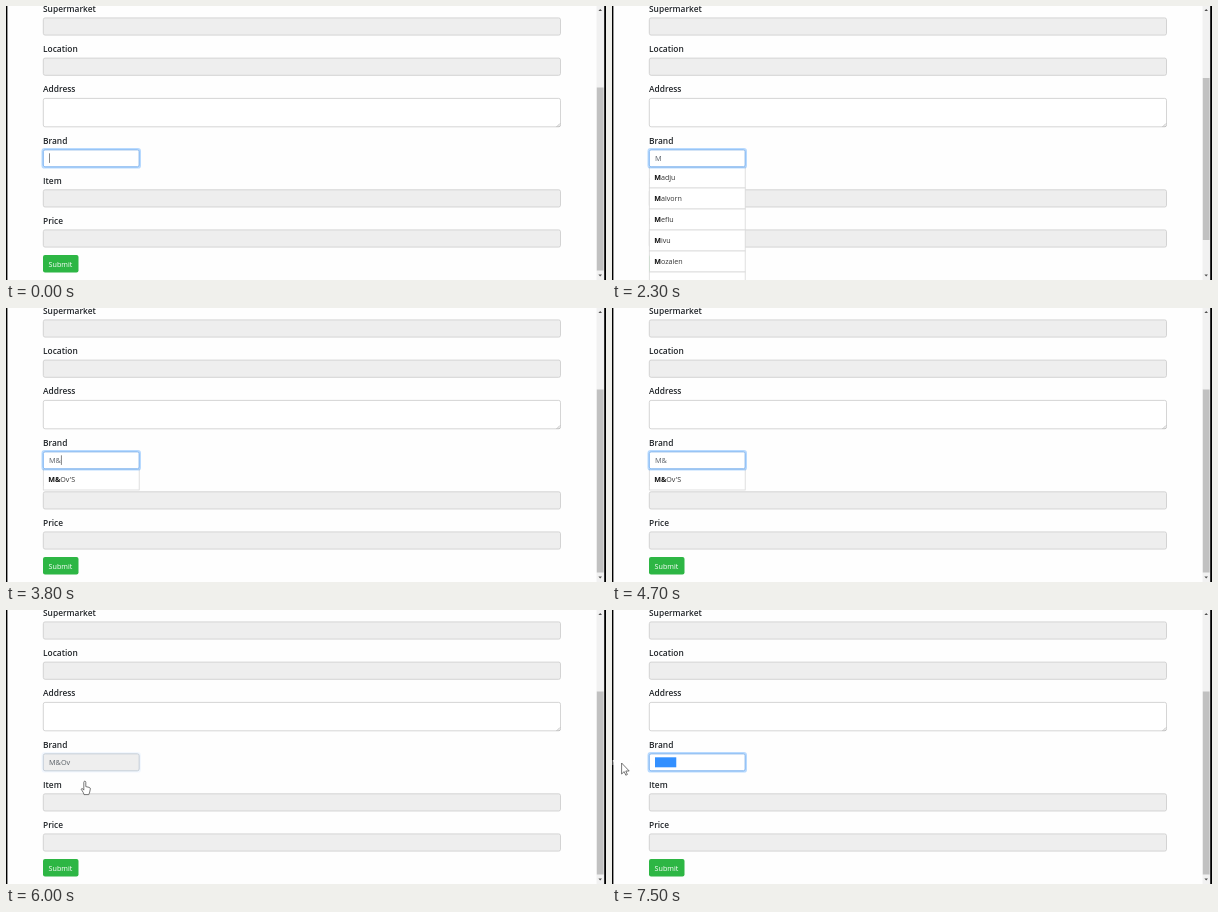
An HTML page that plays this animation: 600x274 px, repeating every 8 s.

```html
<!DOCTYPE html>
<html lang="en">
<head>
<meta charset="utf-8">
<title>Autocomplete form</title>
<style>
html, body { margin: 0; width: 100%; height: 100%; overflow: hidden; background: #fefefe; }
svg { display: block; width: 600px; height: 274px; font: 7.15px "Open Sans", "Noto Sans", sans-serif; }
.label { font-size: 8.4px; font-weight: 600; fill: #212529; }
.box { stroke: #cbcbcb; stroke-width: .8; }
.typed { font-size: 7.3px; fill: #5a6067; }
.item { fill: #333; }
.bold { font-weight: 700; fill: #111; }
.cursor { fill: #fff; stroke: #555; stroke-width: .8; stroke-linejoin: round; }
</style>
</head>
<body>
<svg viewBox="0 0 600 274">
  <g id="form"></g>
  <path d="M554 117.5l-3.5 3.5M554 119.5l-1.5 1.5" stroke="#999" stroke-width=".6"/>
  <rect x="37" y="249" width="35.5" height="17.6" rx="2" fill="#2db644"/>
  <text x="42.6" y="260.6" fill="#fff">Submit</text>

  <rect x="590.5" width="7.5" height="274" fill="#f1f1f1"/>
  <rect id="thumb" x="590.8" width="6.8" fill="#c1c1c1"/>
  <path d="M592.4 5l1.8-2 1.8 2zM592.4 268.5l1.8 2 1.8-2z" fill="#505050"/>
  <path d="M0 0h1.4v274H0zM598.2 0h1.8v274h-1.8z"/>

  <g id="list"></g>
  <rect id="field" class="box" x="37.3" y="143.8" width="95.9" height="17" rx="1.8"/>
  <g id="glow" fill="none">
    <rect x="36.3" y="142.8" width="97.9" height="19" rx="2.4" stroke="#007bff" stroke-opacity=".28" stroke-width="1.6"/>
    <rect x="37.3" y="143.8" width="95.9" height="17" rx="1.8" stroke="#80bdff" stroke-width=".9"/>
  </g>
  <rect id="mark" y="147.3" height="10" fill="#3390ff"/>
  <text class="typed" y="154.8"><tspan id="head" x="43"></tspan><tspan id="tail" fill="#fff"></tspan></text>
  <rect id="caret" y="147.3" width=".8" height="9.6" fill="#666"/>
  <path id="hand" class="cursor" d="M-1 .8Q-1-.4 0-.4T1 .8V5L4.5 5.8Q5.7 6.1 5.5 7.5L4.9 10.5 4 13H-.8L-1.5 11-3.6 7.6Q-3.3 6.4-2 7.3L-1 8.5Z"/>
  <path id="arrow" class="cursor" d="M0 0V11L2.6 8.6 4.2 12.2 5.8 11.5 4.2 8H7.6Z"/>
</svg>
<script>
const $ = id => document.getElementById(id);
const LOOP = 8000, PICK = "M&Ov";
const NAMES = ["Madju", "Malvorn", "Meflu", "Mivu", "Mozalen", "Mubrix"];
const esc = s => s.replace(/&/g, "&amp;");
const set = (id, attrs) => { for (const k in attrs) $(id).setAttribute(k, attrs[k]); };
const show = (id, on) => set(id, { visibility: on ? "visible" : "hidden" });
const within = (t, a, b) => t >= a && t < b;
const clamp = v => Math.min(1, Math.max(0, v));

// label, baseline, box top, box height, fill
const rows = [
  ["Supermarket", 6, 11.9, 17.2, "#eee"],
  ["Location", 46.3, 52.1, 17.2, "#eee"],
  ["Address", 86.4, 92.4, 28.4, "#fff"],
  ["Brand", 137.7],
  ["Item", 177.9, 183.8, 17.2, "#eee"],
  ["Price", 218, 223.9, 17.2, "#eee"]
];
$("form").innerHTML = rows.map(([name, base, top, h, fill]) =>
  (top ? `<rect class="box" x="37.3" y="${top}" width="517.2" height="${h}" rx="1.8" fill="${fill}"/>` : "") +
  `<text class="label" x="37" y="${base}">${name}</text>`).join("");

function listHtml(names, typed, hover) {
  return names.map((name, i) => {
    const y = 161 + 21 * i, n = typed.length;
    return `<rect x="37.3" y="${y}" width="95.9" height="21" stroke="#d8d8d8" stroke-width=".8" fill="${hover ? "#e6e6e6" : "#fff"}"/>
      <text class="item" x="42.2" y="${y + 13.4}"><tspan class="bold">${esc(name.slice(0, n))}</tspan>${esc(name.slice(n))}</text>`;
  }).join("");
}

const caretOn = t => [[0, 200], [2100, 2300], [3100, 3300], [3800, 4200], [4500, 4700], [5300, 5500]]
  .some(([a, b]) => within(t, a, b));

function arrowAt(t) {
  if (within(t, 6100, 6900)) {
    const k = clamp((t - 6600) / 200);
    return [78.5 + 9.5 * k, 171 - 8 * k];
  }
  return t >= 7500 ? [9.6, 153] : null;
}

function draw(time) {
  const t = Math.floor(time / 100) * 100;
  const long = within(t, 1200, 3800), short = within(t, 3800, 5900);
  const typed = t < 1200 ? "" : long ? "M" : short ? "M&" : PICK;
  const picked = t < 7300 ? 0 : t < 7400 ? 2 : 4;
  const cut = typed.length - picked;

  $("list").innerHTML = long ? listHtml(NAMES, typed)
    : short ? listHtml([PICK + "'S"], typed, t >= 5300) : "";
  set("thumb", long ? { y: 72, height: 162 } : { y: 81.5, height: 183 });
  set("field", { fill: within(t, 5900, 7200) ? "#eee" : "#fff" });
  set("glow", { opacity: t < 7000 ? clamp(1 - (t - 5850) / 180) : clamp((t - 7150) / 150) });

  $("head").textContent = typed.slice(0, cut);
  $("tail").textContent = typed.slice(cut);
  const start = 43 + (cut ? $("head").getComputedTextLength() : 0);
  set("mark", { x: start, width: picked ? $("tail").getComputedTextLength() : 0 });
  set("caret", { x: start });
  show("caret", caretOn(t));

  show("hand", within(t, 5300, 6100));
  set("hand", { transform: t < 5400 ? "translate(78.2 170.6)" : "translate(78.8 171.6)" });
  const tip = arrowAt(t);
  show("arrow", tip);
  if (tip) set("arrow", { transform: `translate(${tip})` });
}

const began = performance.now();
function tick() {
  draw((performance.now() - began) % LOOP);
  requestAnimationFrame(tick);
}
tick();
</script>
</body>
</html>
```
